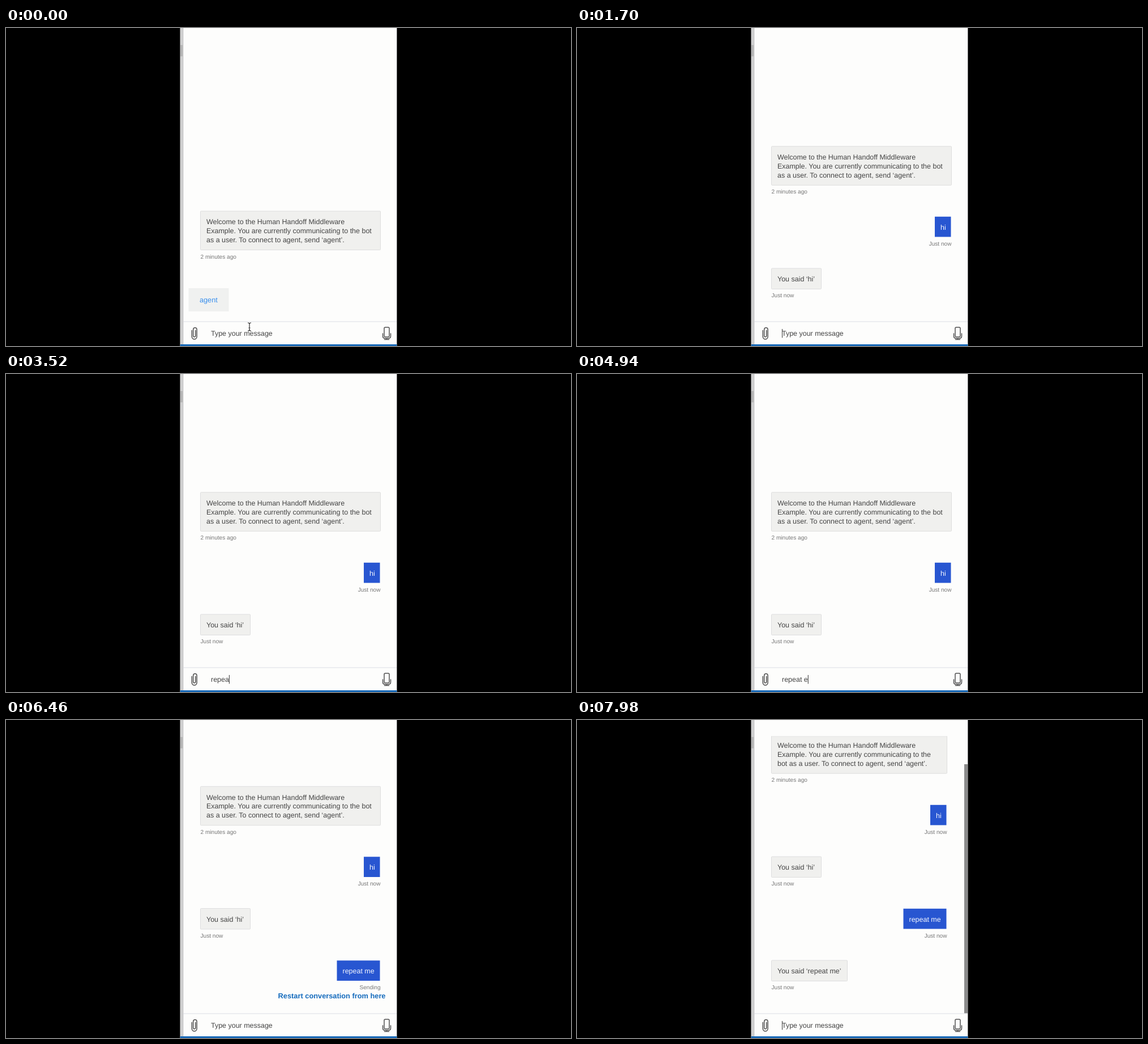
Write an HTML page that moves like this. It is 998 px wide and 561 px high and loops after 8 s.

```html
<!DOCTYPE html>
<html lang="en">
<head>
<meta charset="utf-8">
<title>Chat with a bot</title>
<style>
  html, body { margin: 0; width: 100%; height: 100%; overflow: hidden; background: #000; }
  svg { display: block; width: 998px; height: 561px; }
  text { font: 12.48px "Liberation Sans", Arial, sans-serif; fill: #444; text-rendering: geometricPrecision; white-space: pre; }
  .stamp { font-size: 10.1px; fill: #777; }
  .mine { fill: #f4f7ff; }
  .end { text-anchor: end; }
  .link { font-size: 12.8px; font-weight: bold; fill: #146bbd; }
  .action { font-size: 12.7px; fill: #398fed; }
  .icon { fill: none; stroke: #505050; stroke-width: 1.5; stroke-linecap: round; }
</style>
</head>
<body>
<svg viewBox="0 0 998 561">
  <defs><clipPath id="history"><rect x="313" y="28.5" width="377" height="489"/></clipPath></defs>
  <rect x="307.7" width="382.7" height="561" fill="#fdfdfc"/>
  <rect x="307.7" width="5.3" height="561" fill="#d0d0d0"/>
  <rect x="308" y="30" width="4" height="20" fill="#b5b5b5"/>
  <path d="M313 0V558" stroke="#bdbdc2" stroke-width=".7"/>
  <g id="chat" clip-path="url(#history)"></g>
  <path d="M313 518H690" stroke="#dcdde5"/>
  <rect x="307.7" y="558" width="382.7" height="3" fill="#1769b8"/>
  <path class="icon" d="M334.700 533.500V543a2 2 0 0 1-4 0V532a3.200 3.200 0 0 1 6.400 0V544.500a4.400 4.400 0 0 1-8.800 0V533.500"/>
  <g class="icon">
    <rect x="668" y="528" width="9" height="17" rx="2"/>
    <path d="M665.500 539V543.500q0 4 4 4H675.500q4 0 4-4V539M672.500 547.500V549.500M668.500 549.500H676.500"/>
  </g>
  <text id="entry" x="362" y="543"></text>
  <path id="caret" stroke="#333"/>
  <path id="pointer" d="M427 520q3 0 3 2.500V532q0 2.500-3 2.500M433 520q-3 0-3 2.500M433 534.500q-3 0-3-2.500M428.500 529H431.500" fill="none" stroke="#333" stroke-width="1.200"/>
</svg>
<script>
const LOOP = 8000, LEFT = 343.5, PITCH = 91.5, BLINK = 530;
const FIRST_SENT = 950, FIRST_REPLY = 1280, SECOND_SENT = 6300, SECOND_REPLY = 6560;
const HIDE_POINTER = 450;

// Contents of the entry field from each moment on.
const edits = [
  [300, ''], [500, 'h'], [720, 'hi'], [FIRST_SENT, ''], [FIRST_REPLY, ''],
  [2700, 'r'], [2900, 're'], [3080, 'rep'], [3260, 'repe'], [3440, 'repea'],
  [3640, 'repeat'], [3900, 'repeat '], [4720, 'repeat e'], [5200, 'repeat '],
  [5480, 'repeat m'], [5700, 'repeat me'], [SECOND_SENT, ''], [SECOND_REPLY, '']
];

const welcomeWide = ['Welcome to the Human Handoff Middleware',
  'Example. You are currently communicating to the bot',
  'as a user. To connect to agent, send ‘agent’.'];
const welcomeNarrow = [welcomeWide[0],
  'Example. You are currently communicating to the',
  'bot as a user. To connect to agent, send ‘agent’.'];
const messages = [
  { text: 'hi', width: 28.5, mine: true },
  { text: 'You said ‘hi’', width: 88 },
  { text: 'repeat me', width: 76, mine: true },
  { text: 'You said ‘repeat me’', width: 134 }
];

const $ = id => document.getElementById(id);
const label = (x, y, text, cls = '') => `<text x="${x}" y="${y}" class="${cls}">${text}</text>`;
const box = (x, y, w, h, paint) => `<rect x="${x}" y="${y}" width="${w}" height="${h}" ${paint}/>`;
const GRAY = 'rx="1" fill="#f0f0ee" stroke="#d9d9d9" stroke-width=".8"';
const BLUE = 'fill="#2856d1"';

function bubble({ text, width, mine }, y, right, stamp) {
  const stampY = y + 51.3;
  if (!mine) return box(LEFT, y, width, 36.5, GRAY)
    + label(LEFT + 10.5, y + 23, text) + label(LEFT, stampY, stamp, 'stamp');
  const x = right - 1 - width;
  return box(x, y + .3, width, 35.7, BLUE)
    + label(x + 10, y + 23, text, 'mine') + label(right, stampY, stamp, 'stamp end');
}

function history(count, sending) {
  const scrolled = count === messages.length;
  const right = scrolled ? 653.5 : 661.5;
  const top = count ? 300.3 - PITCH * (count - 1) : 323;
  let out = box(LEFT, top, right - LEFT, 68.5, GRAY);
  (scrolled ? welcomeNarrow : welcomeWide).forEach((line, i) =>
    out += label(354, top + 23.3 + i * 15.8, line));
  out += label(LEFT, top + 83.6, '2 minutes ago', 'stamp');
  messages.slice(0, count).forEach((message, i) => {
    const pending = sending && i === count - 1;
    out += bubble(message, 424 - PITCH * (count - 1 - i), right, pending ? 'Sending' : 'Just now');
  });
  if (!count) out += box(322.5, 459, 71, 41, 'fill="#f0f1f0"') + label(342, 484.3, 'agent', 'action');
  if (sending) out += label(670.5, 491, 'Restart conversation from here', 'link end');
  if (scrolled) {
    out += `<path d="M${LEFT} 29H${right}" stroke="#d9d9d9" stroke-width=".6"/>`;
    out += box(684, 78, 6, 440, 'fill="#8b8b8b"');
  }
  return out;
}

let shown = '';
function draw(t) {
  const count = [FIRST_SENT, FIRST_REPLY, SECOND_SENT, SECOND_REPLY].filter(at => t >= at).length;
  const sending = count % 2 === 1;
  const [since, typed] = edits.findLast(([at]) => t >= at) || [Infinity, ''];
  const key = count + typed;
  if (key !== shown) {
    shown = key;
    $('chat').innerHTML = history(count, sending);
    $('entry').textContent = typed || 'Type your message';
    const x = 362.5 + (typed ? $('entry').getComputedTextLength() : 0);
    $('caret').setAttribute('d', `M${x} 531V546.5`);
  }
  const caretOn = t >= since && !sending && (t - since) % (2 * BLINK) < BLINK;
  $('caret').style.display = caretOn ? '' : 'none';
  $('pointer').style.display = t < HIDE_POINTER ? '' : 'none';
}

const start = performance.now();
function tick() {
  draw((performance.now() - start) % LOOP);
  requestAnimationFrame(tick);
}
tick();
</script>
</body>
</html>
```
